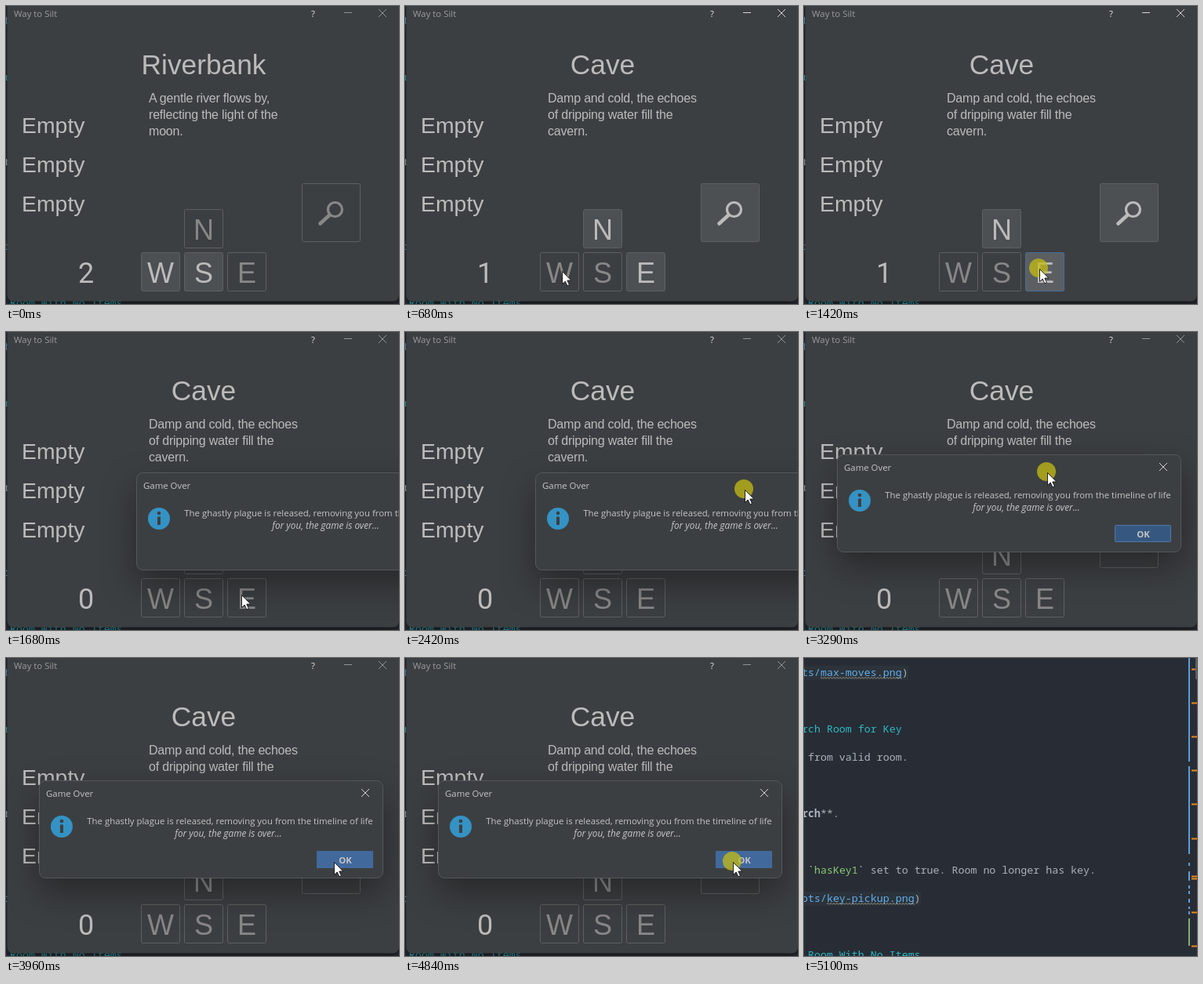
Animation, 501 px wide and 380 px high, one loop 5.57 s. Source, as an HTML page:

```html
<!DOCTYPE html>
<html lang="en">
<head>
<meta charset="utf-8">
<title>Text adventure</title>
<style>
html, body { margin: 0; width: 100%; height: 100%; overflow: hidden; background: #282c34; }
svg { display: block; width: 501px; height: 380px; }
text { white-space: pre; }

.code { font: 13.3px "Noto Sans Mono", monospace; fill: #abb2bf; }
.code .link { fill: #61afef; }
.code .head { fill: #2bbac5; }
.code .name { fill: #89ca78; }
.ui { font: 11.4px "Open Sans", sans-serif; fill: #c4c4c4; }
.ui .slant { font-size: 11.8px; font-style: italic; }
.game { font-family: "Liberation Sans", Arial, sans-serif; fill: #bbb; }
.title { font-size: 35.3px; }
.big { font-size: 36px; }
.count { font: 36px Roboto, sans-serif; }
.mid { font-size: 28.4px; }
.small { font-size: 16px; letter-spacing: -.2px; }
.center { text-anchor: middle; }

.btn rect { fill: #4c5052; stroke: #5e6060; }
.btn.off rect { fill: #3c3f41; }
.btn.off { fill: #878787; color: #878787; }
.btn { color: #bbb; }
.btn.hover rect { fill: #5b5f62; stroke: #466d9c; }
.lens { fill: none; stroke: currentColor; stroke-linecap: round; }
.glyph { fill: none; stroke: #929495; }
.lit { stroke: #d4d4d4; }

.win, .dialog, .fade, .pointer { animation: 5.57s linear infinite; }
.win { animation-name: win; transform-origin: 251px 184px; }
.dialog { animation-name: drag; }
.fade { animation-name: fade; filter: drop-shadow(0 18px 22px rgba(0, 0, 0, .36)); }
.pointer { animation-name: pointer; }
.step { animation: 5.57s step-end infinite; visibility: hidden; }
.river { animation-name: river; }
.cave { animation-name: cave; }
.over { animation-name: over; }
.active { animation-name: active; }
.hoverS { animation-name: hoverS; }
.hoverW { animation-name: hoverW; }
.hoverE { animation-name: hoverE; }
.hoverOk { animation-name: hoverOk; }
.arrow { animation-name: arrow; }
.click { animation-name: click; }

@keyframes river { 0% { visibility: visible } 9.6%, 100% { visibility: hidden } }
@keyframes cave { 0% { visibility: hidden } 9.6% { visibility: visible } 26.5%, 100% { visibility: hidden } }
@keyframes over { 0% { visibility: hidden } 26.5%, 100% { visibility: visible } }
@keyframes active { 0% { visibility: hidden } 6.05% { visibility: visible } 26.5%, 100% { visibility: hidden } }
@keyframes hoverS { 0% { visibility: hidden } 2.3% { visibility: visible } 3.5%, 100% { visibility: hidden } }
@keyframes hoverW { 0% { visibility: hidden } 3.5% { visibility: visible } 9.6%, 100% { visibility: hidden } }
@keyframes hoverE { 0% { visibility: hidden } 20.5% { visibility: visible } 26.5%, 100% { visibility: hidden } }
@keyframes hoverOk { 0% { visibility: hidden } 66%, 100% { visibility: visible } }
@keyframes arrow { 0% { visibility: hidden } 1.24% { visibility: visible } 91.5%, 100% { visibility: hidden } }
@keyframes click {
  0%, 9.6%, 26.5%, 60.1%, 87.7%, 100% { visibility: hidden }
  6.05%, 24.2%, 42.1%, 86.8% { visibility: visible }
}
@keyframes win {
  0%, 88.8% { opacity: 1; transform: none }
  91.5% { opacity: 0; transform: scale(.93) }
  91.51%, 100% { opacity: 0; transform: none }
}
@keyframes fade {
  0%, 26.5% { opacity: 0 }
  26.51% { opacity: .3 }
  30%, 87.6% { opacity: 1 }
  89.8%, 100% { opacity: 0 }
}
@keyframes drag {
  0%, 45.6% { transform: translate(166px, 179px) }
  51.7% { transform: translate(95px, 170px) }
  52.96% { transform: translate(66px, 163px) }
  54.03%, 57.7% { transform: translate(43px, 157px) }
  57.8%, 100% { transform: translate(42px, 156px) }
}
@keyframes pointer {
  0%, 1.25% { transform: translate(256px, 292px) }
  2.4% { transform: translate(246px, 322px) }
  3.58%, 10.8% { transform: translate(197px, 338px); animation-timing-function: ease-in-out }
  22.5%, 30.6% { transform: translate(300px, 335px); animation-timing-function: ease-in-out }
  36.2%, 44.9% { transform: translate(433px, 201px) }
  51.7% { transform: translate(354px, 190px) }
  52.96% { transform: translate(325px, 183px) }
  54.03%, 60.1% { transform: translate(310px, 179px); animation-timing-function: ease-in-out }
  67.5%, 71.05% { transform: translate(417px, 259px) }
  71.06%, 100% { transform: translate(418px, 260px) }
}
</style>
</head>
<body>
<svg viewBox="0 0 501 380">
  <defs>
    <pattern id="wave" width="4" height="3" y="24" patternUnits="userSpaceOnUse">
      <path d="M0 2.5L2 .5L4 2.5" fill="none" stroke="#a8a48c" stroke-width=".9"/>
    </pattern>
  </defs>

  <g class="code">
    <rect width="133" height="18" y="10" fill="#2c333a"/>
    <rect width="149" height="18" y="298" fill="#2c333a"/>
    <text x="-3" y="23"><tspan class="link">ts/max-moves.png</tspan>)</text>
    <text x="-3" y="95" class="head">rch Room for Key</text>
    <text x="-3" y="131"> from valid room.</text>
    <text x="-3" y="203"><tspan font-weight="bold">rch</tspan>**.</text>
    <text x="-3" y="275"> `<tspan class="name">hasKey1</tspan>` set to true. Room no longer has key.</text>
    <text x="-3" y="311"><tspan class="link">ots/key-pickup.png</tspan>)</text>
    <text x="-3" y="383" class="head"> Room With No Items</text>
    <rect x="21" y="24" width="104" height="3" fill="url(#wave)"/>
    <rect x="29" y="312" width="112" height="3" fill="url(#wave)"/>
    <path d="M491 0V132M491 138V250M491 261V265M491 272V284M491 290V294M491 297V301M491 307V312M491 317V320M491 323V327" stroke="#5a9fdc" stroke-width="2"/>
    <path d="M491 332V367" stroke="#7fb06e" stroke-width="2"/>
    <path d="M494 14.5h7m-7 43h7m-7 43h7m-7 43h7m-7 43h7m-7 44h7m-7 48h7m-7 3h7m-7 43h7m-7 43h7" stroke="#e8891c" stroke-width="2"/>
    <rect x="499" width="2" height="27" fill="#5a5e66"/>
  </g>

  <g class="win">
    <rect x="1.5" y="-10" width="499.5" height="386.5" rx="8" fill="#3c3f41" style="filter: drop-shadow(0 4px 8px rgba(0, 0, 0, .6))"/>
    <text class="ui" x="10" y="14" style="fill: #999b9c">Way to Silt</text>
    <text class="ui center" x="391.5" y="13.5" style="fill: #e4e4e4">?</text>
    <path class="glyph" d="M431 8.5h10M475 4l10 10m0-10l-10 10"/>
    <path class="glyph lit step active" d="M431 8.5h10M475 4l10 10m0-10l-10 10"/>
    <g class="game" id="game">
      <text class="mid" x="20" y="162">Empty</text>
      <text class="mid" x="20" y="212">Empty</text>
      <text class="mid" x="20" y="262">Empty</text>
    </g>
  </g>

  <g class="dialog"><g class="fade ui">
    <rect x=".5" y=".5" width="438" height="124" rx="8" fill="#3c3f41" stroke="#55585a"/>
    <text x="9" y="21">Game Over</text>
    <path class="glyph lit" d="M411 11l10 10m0-10l-10 10"/>
    <circle cx="29" cy="59" r="14" fill="#3592c4"/>
    <path d="M29 56.5V67" stroke="#3c3f41" stroke-width="4"/>
    <circle cx="29" cy="52" r="2.3" fill="#3c3f41"/>
    <text class="center" x="243.5" y="56">The ghastly plague is released, removing you from the timeline of life</text>
    <text class="center slant" x="241.5" y="72">for you, the game is over...</text>
    <rect x="354.5" y="90.5" width="71" height="21" rx="1" fill="#365880" stroke="#4c78a8"/>
    <rect class="step hoverOk" x="354" y="90" width="72" height="22" rx="1" fill="#41699b"/>
    <text class="center" x="390.5" y="105.5" font-weight="bold">OK</text>
  </g></g>

  <g class="pointer">
    <circle class="step click" cx="-1" cy="-1" r="12" fill="#c4bc14" fill-opacity=".75"/>
    <path class="step arrow" d="M.5 .5V16.5L4.2 13L6.9 18.8L9.4 17.6L6.8 12H11.8Z" fill="#fff" stroke="#111" stroke-width=".9"/>
  </g>
</svg>
<script>
const places = { N: [227, 259], W: [172, 314], S: [227, 314], E: [282, 314] };

function button(letter, state) {
  const [x, y] = places[letter];
  return `<g class="btn ${state}">
    <rect x="${x + .5}" y="${y + .5}" width="49" height="49" rx="2"/>
    <text class="big center" x="${x + 25}" y="${y + 39}">${letter}</text></g>`;
}

function scene(name, title, lines, moves, exits, canSearch) {
  const keys = Object.keys(places).map(k => button(k, exits.includes(k) ? '' : 'off')).join('');
  const story = lines.map((line, i) => `<text class="small" x="182" y="${123 + 21 * i}">${line}</text>`).join('');
  return `<g class="step ${name}">
    <text class="title center" x="252" y="87">${title}</text>${story}
    <text class="count" x="92" y="353">${moves}</text>${keys}
    <g class="btn ${canSearch ? '' : 'off'}">
      <rect x="377.5" y="226.5" width="74" height="74" rx="2"/>
      <circle class="lens" cx="419.5" cy="259.5" r="9" stroke-width="3.2"/>
      <path class="lens" d="M412 267L400.5 277.5" stroke-width="4.6"/>
    </g></g>`;
}

const river = ['A gentle river flows by,', 'reflecting the light of the', 'moon.'];
const cave = ['Damp and cold, the echoes', 'of dripping water fill the', 'cavern.'];

document.getElementById('game').insertAdjacentHTML('beforeend',
  scene('river', 'Riverbank', river, 2, 'WS', false) +
  scene('cave', 'Cave', cave, 1, 'NE', true) +
  scene('over', 'Cave', cave, 0, '', false) +
  ['S', 'W', 'E'].map(k => `<g class="step hover${k}">${button(k, 'hover')}</g>`).join(''));
</script>
</body>
</html>
```
